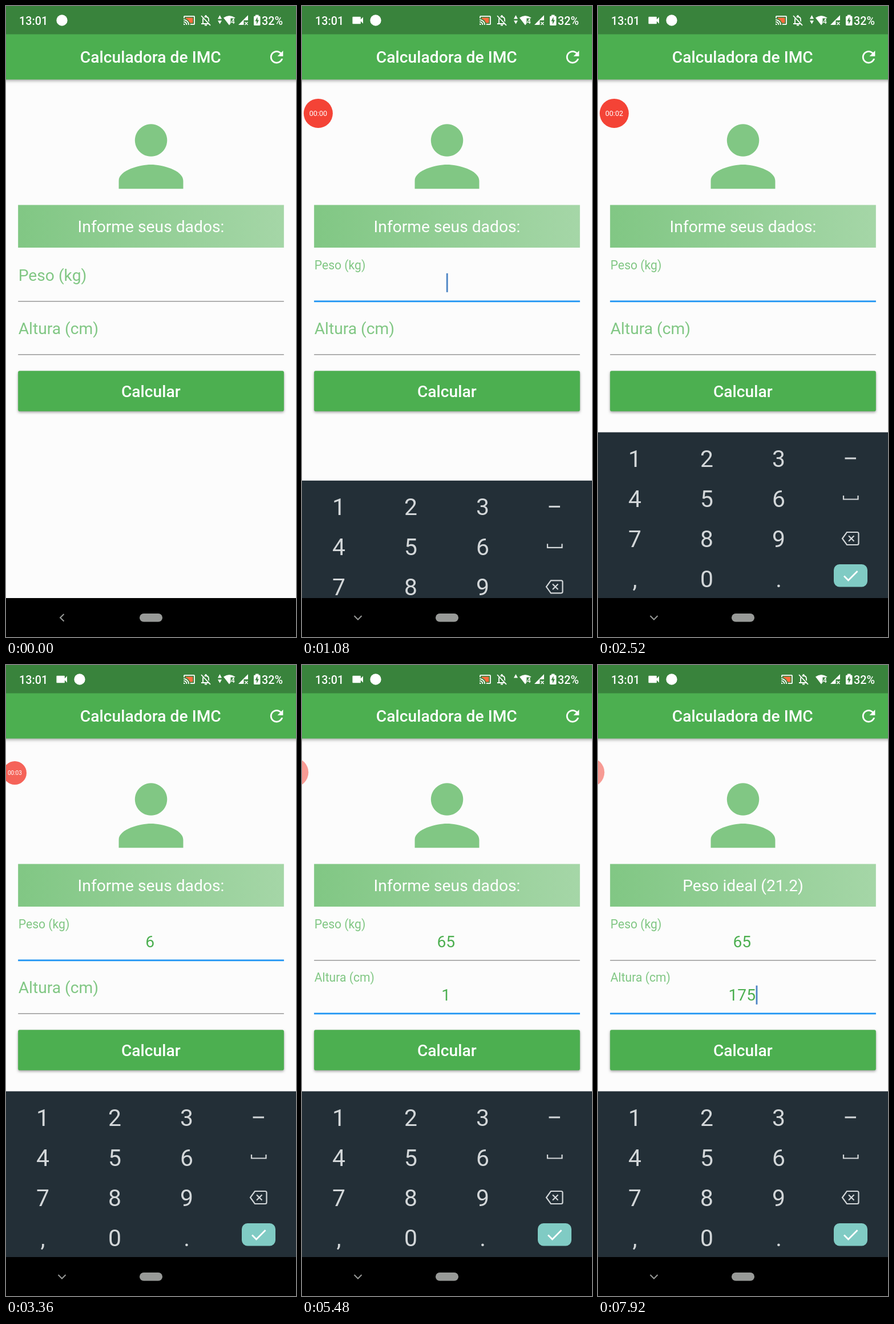
Animation of 508 by 1102 pixels, one loop 8 s. Source, as an HTML page with a canvas:

```html
<!DOCTYPE html>
<html lang="pt">
<head>
<meta charset="utf-8">
<title>Calculadora de IMC</title>
<style>
  html, body { margin: 0; width: 100%; height: 100%; overflow: hidden; background: #fcfcfc; }
  canvas { display: block; width: 508px; height: 1102px; }
</style>
</head>
<body>
<canvas id="stage" width="508" height="1102"></canvas>
<script>
const ctx = document.getElementById('stage').getContext('2d');
const LOOP = 8000;
const FONT = 'Roboto, sans-serif';
const GREEN = '#4caf50', SOFT = '#81c784', PALE = '#a5d6a7', BLUE = '#2196f3';
const KEY = '#d3d7d9', BAR = '#39833c';
const DP = 508 / 360;
const LEFT = 15 * DP, WIDTH = 330 * DP;

const ICON = {
  person: new Path2D('M12 4a4 4 0 1 0 .01 0zM12 14c-2.67 0-8 1.34-8 4v2h16v-2c0-2.66-5.33-4-8-4z'),
  refresh: new Path2D('M17.65 6.35C16.2 4.9 14.21 4 12 4c-4.42 0-7.99 3.58-7.99 8s3.57 8 7.99 8c3.73 0 6.84-2.55 7.73-6h-2.08c-.82 2.33-3.04 4-5.65 4-3.31 0-6-2.69-6-6s2.69-6 6-6c1.66 0 3.14.69 4.22 1.78L13 11h7V4l-2.35 2.35z'),
  cast: new Path2D('M1 18v3h3c0-1.66-1.34-3-3-3zm0-4v2c2.76 0 5 2.24 5 5h2c0-3.87-3.13-7-7-7zM1 10v2c4.97 0 9 4.03 9 9h2c0-6.08-4.93-11-11-11zm20-7H3c-1.1 0-2 .9-2 2v3h2V5h18v14h-7v2h7c1.1 0 2-.9 2-2V5c0-1.1-.9-2-2-2z'),
  screen: new Path2D('M19 7H5v1.63c3.96 1.28 7.09 4.41 8.37 8.37H19z'),
  camera: new Path2D('M17 10.5V7c0-.55-.45-1-1-1H4c-.55 0-1 .45-1 1v10c0 .55.45 1 1 1h12c.55 0 1-.45 1-1v-3.5l4 4v-11z')
};

// Moments of the story, in ms
const T = {
  record: 320, tapWeight: 790, keyboard: 1000, shrink: 3000,
  tapHeight: 3890, tuck: 5160, result: 6710
};
const weightKeys = [[2960, '6'], [3440, '65']];
const heightKeys = [[4960, '1'], [5540, '17'], [5800, '175']];

const clamp = v => Math.max(0, Math.min(1, v));
const ramp = (t, start, ms) => clamp((t - start) / ms);
const ease = v => v * v * (3 - 2 * v);
const out = v => 1 - (1 - v) ** 3;
const mix = (a, b, k) => a + (b - a) * k;
const typed = (keys, t) => keys.reduce((s, [at, text]) => t >= at ? text : s, '');

function text(str, x, y, size, color = '#fff', align = 'center', weight = 400) {
  ctx.font = `${weight} ${size}px ${FONT}`;
  ctx.textAlign = align;
  ctx.fillStyle = color;
  ctx.fillText(str, x, y);
}

function rect(x, y, w, h, color) {
  ctx.fillStyle = color;
  ctx.fillRect(x, y, w, h);
}

function round(x, y, w, h, r, color) {
  ctx.fillStyle = color;
  ctx.beginPath();
  ctx.roundRect(x, y, w, h, r);
  ctx.fill();
}

function disc(x, y, r, color) {
  ctx.fillStyle = color;
  ctx.beginPath();
  ctx.arc(x, y, r, 0, 7);
  ctx.fill();
}

function poly(points, color) {
  ctx.fillStyle = color;
  ctx.beginPath();
  points.forEach(([x, y]) => ctx.lineTo(x, y));
  ctx.fill();
}

function line(d, color, width) {
  ctx.strokeStyle = color;
  ctx.lineWidth = width;
  ctx.stroke(new Path2D(d));
}

function icon(path, cx, cy, scale, color) {
  ctx.save();
  ctx.translate(cx - 12 * scale, cy - 12 * scale);
  ctx.scale(scale, scale);
  ctx.fillStyle = color;
  ctx.fill(path);
  ctx.restore();
}

function shadowed(blur, dy, alpha, draw) {
  ctx.save();
  ctx.shadowColor = `rgba(0,0,0,${alpha})`;
  ctx.shadowBlur = blur;
  ctx.shadowOffsetY = dy;
  draw();
  ctx.restore();
}

function bell(x) {
  ctx.save();
  ctx.translate(x, 25);
  line('M-5 5V-1C-5-4-3-6 0-6S5-4 5-1V5M-8 6H8', '#fff', 1.8);
  rect(-1.4, -9, 2.8, 3, '#fff');
  rect(-2, 7.5, 4, 2, '#fff');
  line('M-6.6-8.8L9 7.6', BAR, 2);
  line('M-8-8L8 8.8', '#fff', 1.8);
  ctx.restore();
}

function statusBar(t) {
  rect(0, 0, 508, 35 * DP, BAR);
  text('13:01', 23, 32.5, 14 * DP, '#fff', 'left', 500);
  const recording = t >= T.record;
  if (recording) icon(ICON.camera, 97.7, 25, 1.03, '#fff');
  disc(recording ? 129 : 98, 25, 9.7, '#fff');

  const shift = t >= T.result ? 10 : 0;
  icon(ICON.screen, 321 + shift, 25, .9, '#ff6b3d');
  icon(ICON.cast, 321 + shift, 25, .9, '#fff');
  bell(350 + shift);
  if (!shift) poly([[371, 22.5], [374.5, 16], [378, 22.5]], '#fff');
  if (t < 4400) poly([[371, 25.5], [374.5, 31.5], [378, 25.5]], '#fff');

  ctx.fillStyle = '#fff';
  ctx.fill(new Path2D('M381 20.5Q391 13.5 401.5 20.5L391 33.5Z'));
  rect(393.5, 21.5, 8, 10.5, BAR);
  text('4', 397.3, 30.8, 12, '#fff', 'center', 500);

  poly([[407, 33], [424, 16], [424, 25], [416.5, 25], [416.5, 33]], '#fff');
  line('M418.5 28L423.5 33M423.5 28L418.5 33', '#fff', 1.5);

  round(434, 17.5, 11.5, 16.5, 1.5, '#fff');
  rect(437, 15.5, 5.5, 3, '#fff');
  poly([[440.5, 19], [436.5, 26.5], [439, 26.5], [439, 32], [443, 24.5], [440.5, 24.5]], BAR);
  text('32%', 448, 32.5, 14 * DP, '#fff', 'left', 500);
}

function header() {
  shadowed(6, 2, .4, () => rect(-10, 49, 528, 91 * DP - 49, GREEN));
  text('Calculadora de IMC', 253.3, 98.6, 20 * DP, '#fff', 'center', 500);
  icon(ICON.refresh, 474.1, 89.2, DP, '#fff');
}

function banner(t) {
  const fill = ctx.createLinearGradient(LEFT, 0, LEFT + WIDTH, 0);
  fill.addColorStop(0, SOFT);
  fill.addColorStop(1, PALE);
  rect(LEFT, 347.5, WIDTH, 74.5, fill);
  text(t < T.result ? 'Informe seus dados:' : 'Peso ideal (21.2)', 254, 394.6, 20 * DP);
}

function field(t, label, y, keys, focusAt, blurAt) {
  const up = ease(ramp(t, focusAt, 200));
  text(label, 21.7, y + mix(-35.7, -55.6, up), mix(20, 15, up) * DP, SOFT, 'left');

  const focus = ramp(t, focusAt, 120) * (1 - ramp(t, blurAt, 120));
  rect(LEFT, y - DP / 2, WIDTH, DP, '#929292');
  ctx.globalAlpha = focus;
  rect(LEFT, y - DP, WIDTH, 2 * DP, BLUE);
  ctx.globalAlpha = 1;

  const value = typed(keys, t);
  text(value, 252.3, y - 22.6, 20 * DP, GREEN);
  // The caret blinks steadily from the moment of focus
  if (t >= focusAt && t < blurAt && (t - focusAt) % 1000 < 500) {
    rect(252.8 + ctx.measureText(value).width / 2, y - 49, 2 * DP, 33, '#4c84c4');
  }
}

function button() {
  shadowed(4, 2, .36, () => round(LEFT, 637.3, WIDTH, 50 * DP, 2 * DP, GREEN));
  text('Calcular', 253.8, 682.5, 20 * DP, '#fff', 'center', 500);
}

function keyboard(t) {
  const rise = out(ramp(t, T.keyboard, 240));
  if (!rise) return;
  ctx.save();
  ctx.translate(0, (1 - rise) * 290);
  rect(0, 744.5, 508, 290, '#232f37');
  ['123', '456', '789', ',0.'].forEach((row, r) =>
    [...row].forEach((c, i) => text(c, 64.6 + i * 126, 804.7 + r * 70, 29 * DP, KEY)));
  rect(432.5, 788.5, 19.5, 3, KEY);
  line('M430 855V861.5H455.5V855', KEY, 2.2);
  line('M436 919H454Q456.5 919 456.5 921.5V938.5Q456.5 941 454 941H436L428 930Z', KEY, 2.2);
  line('M439 925.2L448.5 934.7M448.5 925.2L439 934.7', KEY, 2.2);
  round(413, 975, 59, 39.5, 10, '#80cbc4');
  line('M431 995.5L438.5 1003L454.5 987', '#fff', 2.8);
  ctx.restore();
}

function navBar(t) {
  rect(0, 1034, 508, 68, '#000');
  round(234, 1061, 40, 14.5, 7.2, '#989a98');
  line(t < T.keyboard ? 'M101.5 1062L95 1068.2L101.5 1074.5' : 'M91.5 1065L98 1071.5L104.5 1065', '#989a98', 2);
}

function bubble(t) {
  if (t < T.record) return;
  const small = ease(ramp(t, T.shrink, 240));
  const tuck = ease(ramp(t, T.tuck, 200));
  const x = mix(mix(28.4, 15.4, small), -14, tuck);
  const y = mix(187.4, 188.5, small) - tuck;
  ctx.globalAlpha = ramp(t, T.record - 40, 120) * mix(mix(1, .82, small), .52, tuck);
  disc(x, y, mix(mix(25.5, 20.6, small), 25.3, tuck), '#f44336');
  ctx.globalAlpha = 1 - tuck;
  const secs = Math.floor((t - T.record) / 1000);
  text(`00:0${secs}`, x, y + mix(4.6, 3.6, small), mix(12.6, 10, small));
  ctx.globalAlpha = 1;
}

function draw(t) {
  rect(0, 0, 508, 1102, '#fcfcfc');
  header();
  statusBar(t);
  icon(ICON.person, 254, 262.8, 5 * DP, SOFT);
  banner(t);
  field(t, 'Peso (kg)', 515.8, weightKeys, T.tapWeight, T.tapHeight);
  field(t, 'Altura (cm)', 608.8, heightKeys, T.tapHeight, Infinity);
  button();
  keyboard(t);
  navBar(t);
  bubble(t);
}

const start = performance.now();
function tick() {
  draw((performance.now() - start) % LOOP);
  requestAnimationFrame(tick);
}
tick();
</script>
</body>
</html>
```
